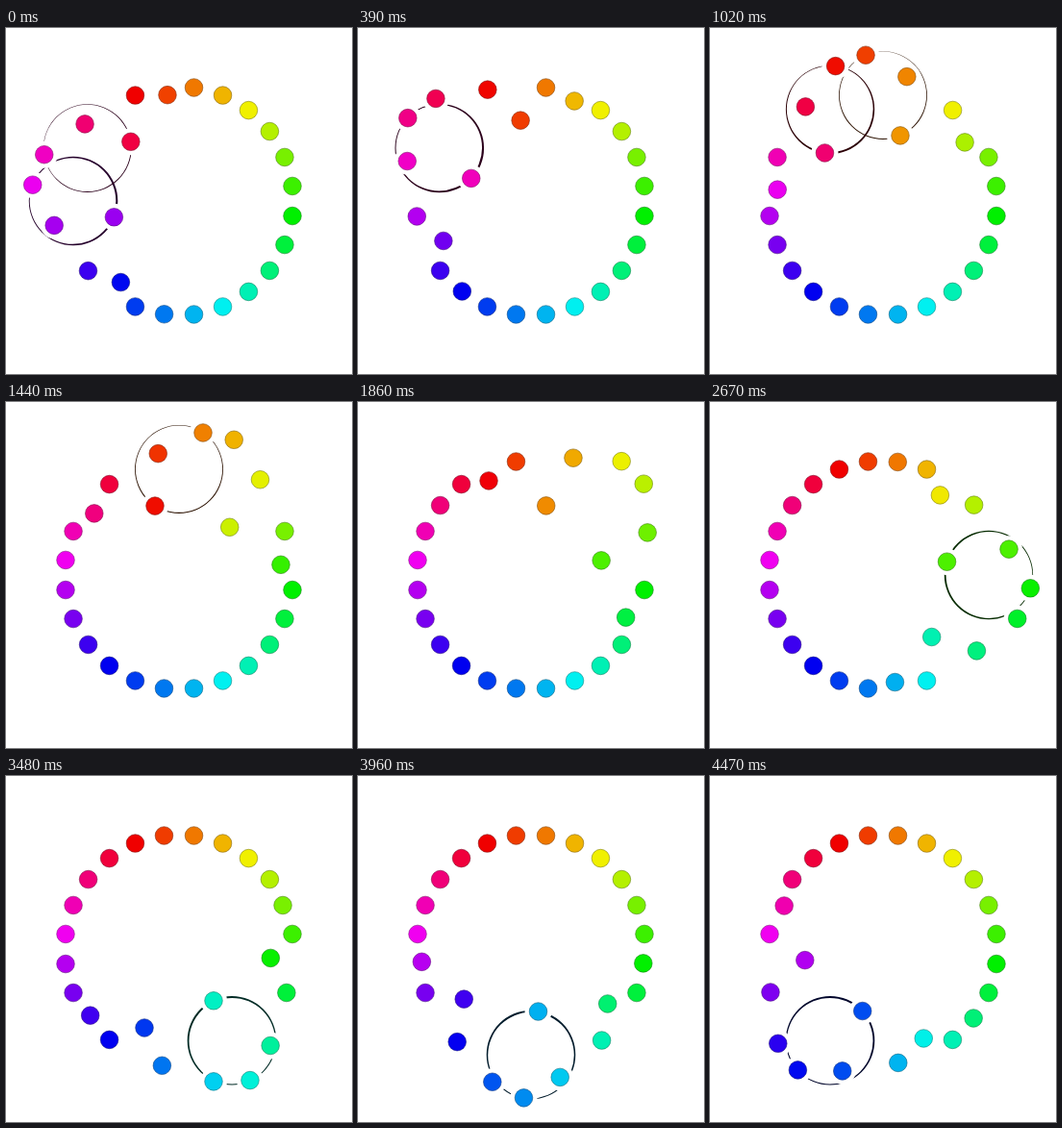
Animation of 360x360 px, one loop 4500 ms. Source, as an HTML page with a canvas:

```html
<!DOCTYPE html>
<html lang="en">
<head>
<meta charset="utf-8">
<title>Turning pairs</title>
<style>
  html, body { margin: 0; width: 100%; height: 100%; overflow: hidden; background: #fff; }
  canvas { display: block; }
</style>
</head>
<body>
<canvas id="stage" width="360" height="360"></canvas>
<script>
const ctx = document.getElementById('stage').getContext('2d');
const LOOP = 4500, STEP = 30;
const PAIRS = 12, STAGGER = 450, TURN = 2250, LEAD = 384;
const CENTER = 180, RING = 119, DOT = 9.3, HALO = 14;
const RAD = Math.PI / 180;
const ORBIT = RING * Math.sin(22.5 * RAD);
const HUB = RING * Math.cos(22.5 * RAD);

// cubic-bezier(.42, 0, .58, 1), solved by bisection
function easeInOut(x) {
  let lo = 0, hi = 1, s = 0.5;
  for (let i = 0; i < 24; i++) {
    s = (lo + hi) / 2;
    const bx = 1.26 * s * (1 - s) ** 2 + 1.74 * s * s * (1 - s) + s ** 3;
    if (bx < x) lo = s; else hi = s;
  }
  return s * s * (3 - 2 * s);
}

// Degrees turned by a pair; the wave runs clockwise around the ring
function turnAt(index, time) {
  const cycle = PAIRS * STAGGER;
  const local = (time + LEAD - (index - 11) * STAGGER) % cycle;
  return 180 * easeInOut(Math.min(1, local / TURN));
}

function disc(x, y, radius, color) {
  ctx.fillStyle = color;
  ctx.beginPath();
  ctx.arc(x, y, radius, 0, 2 * Math.PI);
  ctx.fill();
}

// Hue follows the direction from the middle of the stage
function hueAt(x, y) {
  return Math.atan2(x - CENTER, CENTER - y) / RAD + 22.5;
}

// A thin ring, heavier on the side facing the middle of the stage
function drawOrbit(x, y, turn, hue) {
  const strength = Math.sqrt(Math.max(0, 1 - ((turn - 98) / 52) ** 2));
  const weight = strength * Math.min(1, Math.abs(hue - 60) / 60);
  if (weight < 0.3) return;
  const half = 0.75 * weight;
  const shift = 0.8 * half / HUB;
  ctx.fillStyle = `hsl(${hue}, 90%, 9%)`;
  ctx.beginPath();
  ctx.arc(x, y, ORBIT + half, 0, 2 * Math.PI);
  ctx.closePath();
  ctx.arc(x + (x - CENTER) * shift, y + (y - CENTER) * shift, ORBIT - half, 0, 2 * Math.PI);
  ctx.fill('evenodd');
}

function drawDot(x, y) {
  const hue = hueAt(x, y);
  disc(x, y, DOT, `hsl(${hue}, 100%, 47%)`);
  ctx.lineWidth = 0.6;
  ctx.strokeStyle = `hsl(${hue}, 80%, 28%)`;
  ctx.stroke();
}

function draw(time) {
  ctx.fillStyle = '#fff';
  ctx.fillRect(0, 0, 360, 360);
  const dots = [];
  for (let i = 0; i < PAIRS; i++) {
    const angle = i * 30;
    const x = CENTER + HUB * Math.sin(angle * RAD);
    const y = CENTER - HUB * Math.cos(angle * RAD);
    const turn = turnAt(i, time);
    const dx = ORBIT * Math.cos((angle + turn) * RAD);
    const dy = ORBIT * Math.sin((angle + turn) * RAD);
    drawOrbit(x, y, turn, angle + 22.5);
    dots.push([x + dx, y + dy], [x - dx, y - dy]);
  }
  for (const [x, y] of dots) disc(x, y, HALO, '#fff');
  for (const [x, y] of dots) drawDot(x, y);
}

const start = performance.now();
function tick() {
  const time = (performance.now() - start) % LOOP;
  draw(Math.floor(time / STEP) * STEP);
  requestAnimationFrame(tick);
}
tick();
</script>
</body>
</html>
```
